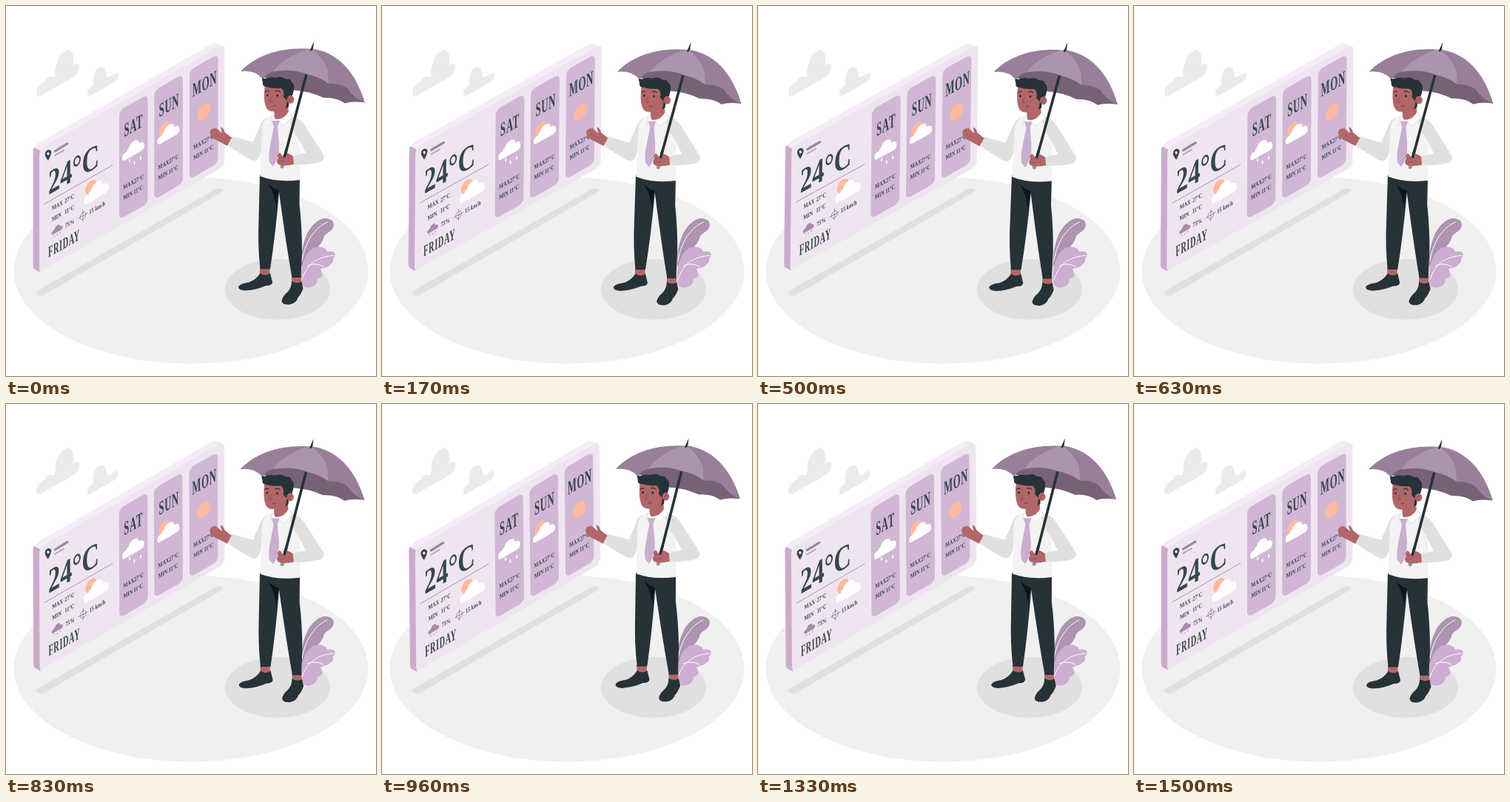
Recreate the animation shown at these times as an HTML page with a canvas. Size 500 by 500 pixels, loop 1540 ms.

```html
<!DOCTYPE html>
<html lang="en">
<head>
<meta charset="utf-8">
<title>Weather board</title>
<style>
  html, body { margin: 0; width: 100%; height: 100%; overflow: hidden; background: #fff; }
  canvas { display: block; width: 500px; height: 500px; }
</style>
</head>
<body>
<canvas id="stage" width="500" height="500"></canvas>
<script>
const ctx = document.getElementById('stage').getContext('2d');
const LOOP = 1540, STEP = 1000 / 24, SWAY = 1500;
const PIVOT = { x: 260.5, y: 224.5 };
const SLOPE = -0.572;
const NARROW = 0.49, REGULAR = 0.7;
const INK = '#37474f', DARK = '#263238', SKIN = '#b16668', SUN = '#ffb9a0';
const FRONT = '#efe5f1', LILAC = '#d0b7d4', SLEEVE = '#e0e0e0';

function fill(color, d) {
  ctx.fillStyle = color;
  ctx.fill(new Path2D(d));
}

function stroke(color, width, d) {
  ctx.strokeStyle = color;
  ctx.lineWidth = width;
  ctx.stroke(new Path2D(d));
}

function ellipse(color, x, y, rx, ry = rx) {
  ctx.fillStyle = color;
  ctx.beginPath();
  ctx.ellipse(x, y, rx, ry, 0, 0, 2 * Math.PI);
  ctx.fill();
}

function roundRect(color, w, h, r) {
  ctx.fillStyle = color;
  ctx.beginPath();
  ctx.roundRect(0, 0, w, h, r);
  ctx.fill();
}

// Draws in the slanted plane of the board, with its origin at (x, y).
function onBoard(x, y, draw) {
  ctx.save();
  ctx.transform(1, SLOPE, 0, 1, x, y);
  draw();
  ctx.restore();
}

function label(text, x, y, size, width = REGULAR, spacing = 0) {
  onBoard(x, y, () => {
    ctx.scale(width, 1);
    ctx.font = `bold ${size}px "Liberation Serif", serif`;
    ctx.letterSpacing = `${spacing}px`;
    ctx.fillStyle = INK;
    ctx.fillText(text, 0, 0);
  });
}

function heading(text, x, y, size) {
  label(text, x, y, size, NARROW, 1.3);
}

function cloud(color, x, y, scale) {
  onBoard(x, y, () => {
    ctx.scale(scale, scale);
    fill(color, 'M4 0Q0 0 0-5Q0-10 6-10Q6-13 9-13Q10-19 16-19Q22-19 23-12Q30-12 30-5Q30 0 26 0Z');
  });
}

function sun(x, y, rx, ry) {
  onBoard(x, y, () => ellipse(SUN, 0, 0, rx, ry));
}

function drawGround() {
  fill('#ebebeb', 'M41 120Q41 108 52 102Q55 94 66 96Q66 74 76 63Q88 54 91 68Q92 75 90 81Q98 74 99 81Q100 91 90 97L47 121Q42 123 41 120Z');
  fill('#ebebeb', 'M110 120Q110 111 118 107Q117 92 123 85Q134 77 136 92L136 96Q139 97 143 94Q151 88 152 93Q152 101 144 104L115 121Q110 123 110 120Z');
  ellipse('#f0f0f0', 250, 357.5, 239.5, 126);
  fill('#e0e0e0', 'M42 385L282 248Q286 245 291 247Q296 249 291 252L52 390Q47 393 43 390Q39 388 42 385Z');
  ellipse('#e0e0e0', 367, 383, 71, 41);
}

function drawPlant() {
  fill('#ad94b0', 'M399 347C399 318 410 292 429 287C441 286 446 294 441 301C437 307 430 307 429 314C427 322 416 330 399 352Z');
  stroke('#fff', 1, 'M400 344C404 320 416 300 434 292');
  fill('#ccaed0', 'M399 372C398 350 404 331 418 326C428 324 433 328 434 332C443 330 448 335 443 340C440 342 445 346 439 349C434 355 426 353 425 357C431 363 425 368 421 369C421 378 411 382 405 380Q400 379 399 372Z');
  stroke('#fff', 1, 'M400 370C406 349 420 339 443 337M407 351Q418 346 429 352');
}

function drawColumn(x, y, day) {
  onBoard(x, y, () => roundRect(LILAC, 38.6, 147.5, 6.5));
  heading(day, x + (day === 'MON' ? 4 : 6.5), y + 36, 26);
  label('MAX27°C', x + 5.3, y + 107.3, 8.8);
  label('MIN 11°C', x + 5.3, y + 121.3, 8.8);
}

function drawBoard() {
  for (let i = 12; i > 0; i--) {
    onBoard(45 - 8.5 * i / 12, 193.5 - 4 * i / 12, () => roundRect('#f4ecf6', 250.5, 166, 9));
  }
  fill('#cbabcd', 'M36.7 196Q36.6 191 39 191.5L46 195.5V359.8L39 356Q36.7 354.5 36.7 351Z');
  onBoard(45, 193.5, () => roundRect(FRONT, 250.5, 166, [8, 8, 8, 4]));

  fill(INK, 'M57 209Q52.5 203.5 52.7 200Q53 196 57 194.3Q61.5 194.5 61.4 198Q60.5 203 57 209Z');
  ellipse(FRONT, 57, 199.5, 1.7, 2);
  stroke('#9d80a4', 3.2, 'M66.5 196L83 186');
  stroke('#b59aba', 1.7, 'M66 202L78 195');
  label('24°C', 57, 255.5, 46.5);
  stroke('#a98aae', 0.9, 'M52 267.5L144 215');

  label('MAX', 62, 276.5, 8.8);
  label('27°C', 79.2, 266.8, 8.8);
  label('MIN', 62, 291.5, 8.8);
  label('11°C', 79.2, 281.5, 8.8);
  label('75%', 80, 300, 8.8);
  label('15 km/h', 112.5, 281.5, 8.8);
  heading('FRIDAY', 57, 340, 21);

  sun(115, 245, 8, 9);
  cloud('#fff', 105, 269.5, 1.13);
  cloud('#a98aae', 61.5, 310, 0.5);
  stroke('#a98aae', 0.9, 'M65 309.5v1.7M69 308.5v1.7M73 305.5v1.7');
  onBoard(104, 283.5, () => {
    stroke('#8c7891', 0.7, 'M-4 0A4 4.5 0 1 1 4 0A4 4.5 0 1 1-4 0M-6.5 0H-2M2 0H6.5M0-7.5V-3M0 3V7.5');
    ellipse('#8c7891', 0, 0, 1.3);
  });

  drawColumn(153, 141.3, 'SAT');
  drawColumn(200.3, 114.2, 'SUN');
  drawColumn(248, 86.9, 'MON');
  cloud('#fff', 157, 210.5, 1);
  stroke('#fff', 1.8, 'M167 207.5v2.5M173.5 210.5v2.5M182 204.5v2.5');
  sun(214.5, 167, 7.8, 9);
  cloud('#fff', 204.5, 188.5, 1);
  sun(267.5, 143, 9, 10.3);
}

function drawLegs() {
  fill(SKIN, 'M343 353H356.5V365H343ZM386 364H399V377H386Z');
  fill(DARK, 'M343.5 361Q351 366 357 361L360 373Q360 378 351 378Q337 384 323 384.5Q314 384 314 379.5Q316 375 328 373.5Q338 370 343.5 361Z');
  fill(DARK, 'M386 372Q393 376 399.5 372.5L401.5 382Q398 391 394.5 394Q392 402 383 403.5Q372.5 404 372.5 398Q374 392 380 387Q386 381 386 372Z');
  fill(DARK, 'M343 228L397 232L396.5 268Q400 298 400 330L398.5 367H386.5Q379 325 369 252Q364 310 357 355.5H343.5Q340 325 341.5 288Z');
  fill('#0c1418', 'M354 240Q361 247 369 249Q365 258 366 278Q364 254 354 240Z');
}

function drawShirt() {
  fill(SLEEVE, 'M356 149Q347 151 343 163L334 184L305 176L297 187L329 207Q338 212 342 204L352 180Z');
  fill(SKIN, 'M305 178L296 171Q293 163 290 164L292 172L284 165Q276 165 275.5 171Q276 178 284 181L299 189Z');
  fill('#f3f3f3', 'M361 147Q348 150 346 165L343.5 230Q367 239 397.5 235L397 185L390 151L380 142Z');
  fill(SLEEVE, 'M384 149Q397 150 403 160L428.5 200Q432 207 425 211Q408 215 389.5 214.5L388 202.5L405 198.5L394 177Q382 163 384 149Z');
  fill(SKIN, 'M362 138L381 134L382 145Q374 154 363 153Z');
  fill('#fff', 'M360 147L366 155L357 162ZM383 141L387 151L375 161L366 155Q377 152 383 141Z');
  stroke('#d6d6d6', 0.7, 'M360 148L357 162L363 158M383 142L387 151L375 161L368 156');
  fill('#c9aed0', 'M359 155L370 155L367 163L369 187Q370 204 361 217L356 211Q354 202 358 183L362 163Z');
}

function drawHead() {
  fill(SKIN, 'M350 106Q347 128 352 138Q356 144 365 142Q376 142 381 131L381 108Z');
  fill(DARK, 'M347 103Q344 96 350 98Q358 95 364 97Q373 94 378 99Q385 98 386 103Q392 106 387 121L383 123L382 136L378 139L380 128L375 123Q377 115 372 111Q360 112 352 109Q346 109 347 103Z');
  ellipse(SKIN, 384.5, 126.3, 4.8, 5.5);
  stroke('#81454a', 0.9, 'M382 129Q383 124 386 124M359 123L356 129Q358 130 360 129');
  ellipse(DARK, 353.3, 120.5, 1.4, 1.6);
  ellipse(DARK, 366.8, 121, 1.4, 1.6);
  stroke(DARK, 1.2, 'M350.5 116Q352 114 355 115M364.5 115Q368 113.5 370.5 116');
  stroke('#733b43', 1, 'M361 134.8Q363 135 364.5 134');
}

function drawUmbrella() {
  fill('#766277', 'M346 96L362 80L412 75L461 109L485 130.5Q468 128 458 131.5Q447 123 429 124Q410 115 390 114Q371 99 346 96Z');
  fill('#987f9a', 'M317 88.5C338 66 373 55 411 58Q380 67 362 88Q351 91 347 99Q337 86 317 88.5Z');
  fill('#ab94ad', 'M411 57.5Q377 67 361 88.5Q386 84 407 92Q424 96 436 105Q438 74 411 57.5Z');
  fill('#987f9a', 'M411 57.5Q438 75 436 105Q450 104 461 111Q470 125 485 130.5C472 87 446 61 411 57.5Z');
  stroke(DARK, 3.6, 'M405.5 94L376 206');
  fill(DARK, 'M416.3 47.5L415 57.5L412.5 61L410.7 60Z');
  stroke('#8b949b', 5, 'M375 211L373.3 217');
  fill(SKIN, 'M370 198Q365 202 368 205Q364 210 368 214Q374 217 389 214L388 203Q381 198 378 199L374 203Z');
  stroke('#8d4b52', 0.7, 'M369 205L376 206M369 210L376 210');
  stroke(DARK, 3.6, 'M379 194L376.5 203');
}

// Linear swing in degrees: 0, +1 at a quarter, -1 at three quarters, 0.
function swing(ms) {
  const p = (ms % SWAY) / SWAY;
  if (p < 0.25) return 4 * p;
  return p < 0.75 ? 2 - 4 * p : 4 * p - 4;
}

function render(now) {
  const step = Math.floor((now % LOOP + 5) / STEP);
  const angle = swing(Math.min(step, 36) * STEP) * Math.PI / 180;
  ctx.clearRect(0, 0, 500, 500);
  ctx.lineCap = 'round';
  ctx.lineJoin = 'round';
  drawGround();
  drawPlant();
  ctx.save();
  ctx.translate(PIVOT.x, PIVOT.y);
  ctx.rotate(angle);
  ctx.translate(-PIVOT.x, -PIVOT.y);
  drawBoard();
  drawLegs();
  drawShirt();
  drawUmbrella();
  drawHead();
  ctx.restore();
  requestAnimationFrame(render);
}

requestAnimationFrame(render);
</script>
</body>
</html>
```
